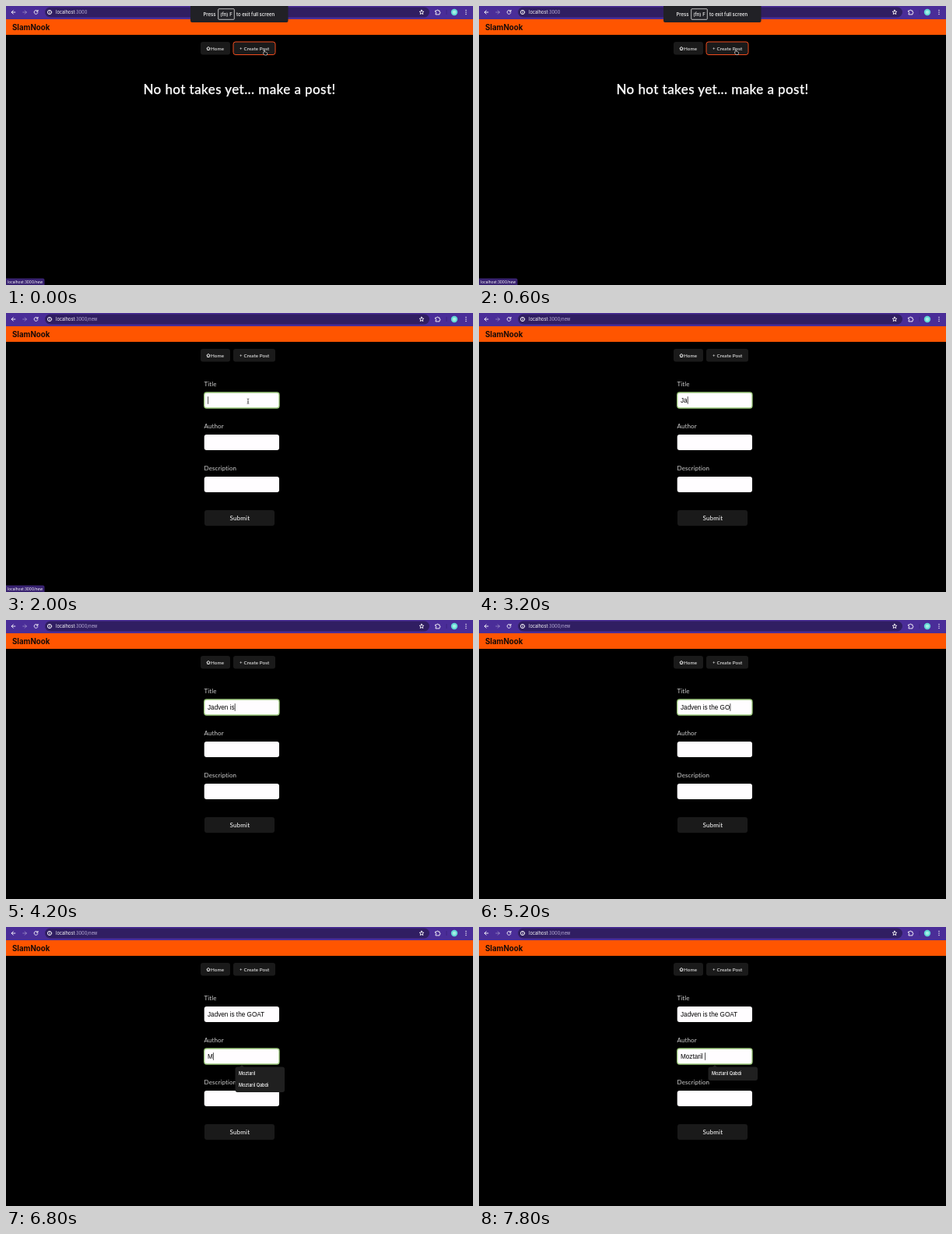
An HTML page for the animation above (8000 ms loop, 600 by 358 pixels).

```html
<!DOCTYPE html>
<html lang="en">
<head>
<meta charset="utf-8">
<title>New post form</title>
<style>
  html, body { margin: 0; width: 100%; height: 100%; overflow: hidden; background: #000; }
  svg { display: block; width: 600px; height: 358px; }
  text { fill: #fff; white-space: pre; }
  .ui { font-family: Inter, Roboto, sans-serif; }
  .page { font-family: Lato, "Open Sans", sans-serif; }
  .label { font-size: 8px; letter-spacing: .1px; fill: #d0d0d0; }
  .nav { font-size: 6.3px; letter-spacing: .07px; }
  .field { font: 8.2px "Liberation Sans", Arial, sans-serif; fill: #000; }
  .icon { fill: none; stroke: #fff; stroke-width: .9; stroke-linecap: round; stroke-linejoin: round; }
  .panel { fill: #1a1a1a; }
</style>
</head>
<body>
<svg viewBox="0 0 600 358">
  <rect width="600" height="358"/>

  <!-- browser bar -->
  <g class="ui">
    <rect width="600" height="17" fill="#4a2d98"/>
    <rect x="50" y="1.5" width="494" height="13" rx="6.5" fill="#301e62"/>
    <path class="icon" d="M11.8 8H7.2M9.3 5.8L7.1 8l2.2 2.2"/>
    <path class="icon" d="M21.7 8h4.6M24.2 5.8L26.4 8l-2.2 2.2" opacity=".4"/>
    <path class="icon" d="M40.6 6.6A2.4 2.4 0 1 0 40.9 8.6M41 5.3v1.7h-1.7"/>
    <circle cx="56" cy="8" r="2.6" class="icon" stroke-width=".7"/>
    <path class="icon" d="M56 7.9v1.3M56 6.6v.1" stroke-width=".7"/>
    <text x="64" y="10.1" font-size="5.7">localhost<tspan id="path" fill="#b9aed8"></tspan></text>
    <path class="icon" stroke-width=".7" d="M534 5.2l.8 1.8 2 .2-1.5 1.3.5 2-1.8-1-1.8 1 .5-2-1.5-1.3 2-.2z"/>
    <path class="icon" d="M552 6h1.6a.9.9 0 0 1 1.8 0h1.6v1.7a.9.9 0 0 1 0 1.8v1.4h-5V9.500a.9.9 0 0 0 0-1.800z"/>
    <path d="M566 5v6" stroke="#3a237c" stroke-width=".8"/>
    <circle cx="576" cy="8" r="4.200" fill="#62d8d4"/>
    <circle cx="576" cy="8" r="2.300" fill="#a5eee6"/>
    <g fill="#fff"><circle cx="591" cy="5.500" r=".7"/><circle cx="591" cy="8" r=".7"/><circle cx="591" cy="10.500" r=".7"/></g>
  </g>

  <!-- site header and navigation -->
  <rect y="17" width="600" height="20" fill="#ff5500"/>
  <text class="ui" x="8" y="31" font-size="9.7" font-weight="700" style="fill:#160b08">SlamNook</text>
  <g class="page nav">
    <rect class="panel" x="250" y="46" width="38" height="16.500" rx="3"/>
    <path class="icon" stroke-width=".7" d="M258.100 54.300l1.900-2 1.900 2M258.700 54v2.500h2.600V54"/>
    <text x="263" y="56.500">Home</text>
    <rect id="create" class="panel" x="292" y="46" width="54" height="16.500" rx="3"/>
    <text x="300" y="56.500">+ Create Post</text>
  </g>

  <text id="empty" class="page" x="300" y="113" text-anchor="middle" font-size="17" font-weight="500"
        letter-spacing=".42" stroke="#fff" stroke-width=".25">No hot takes yet... make a post!</text>

  <g id="form" class="page">
    <g id="fields"></g>
    <rect class="panel" x="255" y="253" width="90" height="20" rx="3"/>
    <text x="300.300" y="266" text-anchor="middle" font-size="8.2" letter-spacing=".1">Submit</text>
    <path id="caret" stroke="#000" stroke-width=".7"/>
    <g id="suggest" class="ui" font-size="5.5" font-weight="500">
      <path d="M299.500 180.500l3.500-3.500 3.500 3.500z" fill="#202020"/>
      <rect id="list" x="294.500" y="179.500" width="63.500" rx="3" fill="#202020"/>
      <text id="row0" x="299" y="190.300"></text>
      <text id="row1" x="299" y="205.300"></text>
    </g>
  </g>

  <g id="status" class="ui">
    <path d="M0 349.500h47.500a2 2 0 0 1 2 2V358H0z" fill="#382270"/>
    <text x="2" y="355.600" font-size="4.8">localhost:3000/new</text>
  </g>

  <g id="notice" class="ui" font-size="6" font-weight="500">
    <path d="M237 0h125.500v19a2 2 0 0 1-2 2H239a2 2 0 0 1-2-2z" fill="#212126"/>
    <text x="253.500" y="12.800">Press</text>
    <rect x="272.700" y="3.700" width="20.600" height="13.600" rx="1" fill="none" stroke="#fff" stroke-width=".7"/>
    <text x="283" y="12.800" text-anchor="middle">(fn) F</text>
    <text x="296" y="12.800">to exit full screen</text>
  </g>

  <path id="hand" fill="#000" stroke="#fff" stroke-width=".6" stroke-linejoin="round"
        d="M0 .6q.6-1 1.200 0v2.300l2.700.700q.6.300.500 1l-.500 2.400H.9L-.9 4.600q-.1-.9.9-.4z"/>
  <path id="beam" fill="none" stroke="#333" stroke-width=".7" d="M-1.300-3.200q1.300 0 1.300 .8q0-.8 1.300-.8M0-2.500v5M-1.300 3.200q1.300 0 1.300-.8q0 .8 1.300 .8M-.9 .8h1.800"/>
</svg>

<script>
const LOOP = 8000, STEP = 200;
const TITLE = 'Jadven is the GOAT', FIRST = 'Moztaril', FULL = 'Moztaril Qabdi';
const $ = id => document.getElementById(id);
const show = (id, on) => $(id).style.display = on ? '' : 'none';

// [time, value...] keys
const titleKeys = [[0, 0], [3000, 1], [3200, 2], [3600, 4], [3800, 6], [4000, 7], [4200, 9], [4400, 10],
  [4600, 12], [4800, 13], [5000, 15], [5200, 16], [5400, 17], [5600, 18]];
const authorKeys = [[0, 0], [6600, 1], [7000, 2], [7200, 4], [7400, 6], [7600, 8], [7800, 9]];
const mouseKeys = [[0, 331.3, 56], [400, 331.3, 56], [1400, 320.5, 53], [1600, 320.5, 53],
  [1800, 312.5, 100], [2000, 311, 113.2], [LOOP, 311, 113.2]];

const held = (keys, t) => keys.filter(k => k[0] <= t).pop()[1];
function tween(keys, t) {
  const i = keys.findIndex(k => k[0] > t), [a, b] = [keys[i - 1], keys[i]];
  const p = (t - a[0]) / (b[0] - a[0]);
  return [1, 2].map(n => a[n] + (b[n] - a[n]) * p);
}

const fieldY = i => 102 + 54 * i;
$('fields').innerHTML = ['Title', 'Author', 'Description'].map((name, i) => `
  <text class="label" x="254.500" y="${fieldY(i) - 8}">${name}</text>
  <rect id="box${i}" x="254.700" y="${fieldY(i)}" width="96.300" height="20" rx="3" fill="#fffdff" stroke-width="1.300"/>
  <text id="value${i}" class="field" xml:space="preserve" x="259" y="${fieldY(i) + 13}"></text>`).join('');

function draw(t) {
  const onForm = t >= 1600;
  $('path').textContent = onForm ? ':3000/new' : ':3000';
  show('empty', !onForm);
  show('form', onForm);
  show('status', t < 2200);
  $('notice').style.opacity = Math.max(0, Math.min(1, (1200 - t) / 600));
  $('create').setAttribute('stroke', t < 1800 ? '#ee4a1c' : 'none');

  const [x, y] = tween(mouseKeys, t);
  for (const id of ['hand', 'beam']) $(id).setAttribute('transform', `translate(${x} ${y})`);
  show('hand', t < 1800);
  show('beam', t >= 1800 && t < 3000);

  const typed = held(authorKeys, t);
  $('value0').textContent = TITLE.slice(0, held(titleKeys, t));
  $('value1').textContent = FULL.slice(0, typed);

  const focus = t < 2000 ? -1 : t < 6000 ? 0 : 1;
  for (const i of [0, 1, 2]) $('box' + i).setAttribute('stroke', i === focus ? '#9cc97c' : 'none');
  const blinkedOff = t >= 2600 && t < 3000;
  show('caret', focus >= 0 && !blinkedOff);
  if (focus >= 0) {
    const end = 259.6 + $('value' + focus).getComputedTextLength();
    $('caret').setAttribute('d', `M${end} ${fieldY(focus) + 5.2}v9.600`);
  }

  const rows = typed > FIRST.length ? [FULL] : [FIRST, FULL];
  show('suggest', t >= 6800);
  $('list').setAttribute('height', 2.5 + 15 * rows.length);
  $('row0').textContent = rows[0];
  $('row1').textContent = rows[1] || '';
}

const start = performance.now();
function frame() {
  const t = (performance.now() - start) % LOOP;
  draw(Math.floor(t / STEP) * STEP);
  requestAnimationFrame(frame);
}
frame();
</script>
</body>
</html>
```
